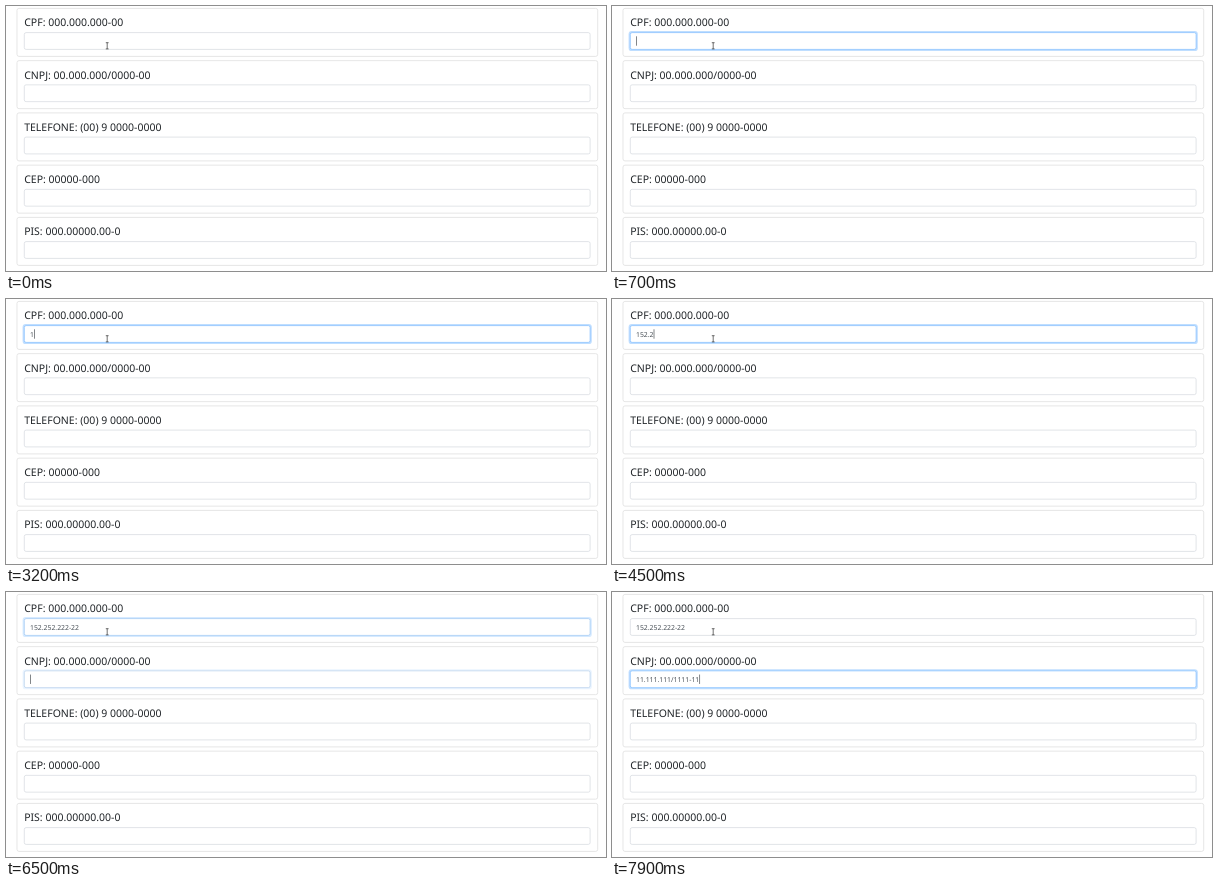
Write an HTML page that moves like this. It is 600x265 px and loops after 8 s.

```html
<!DOCTYPE html>
<html lang="pt">
<head>
<meta charset="utf-8">
<style>
html, body { margin: 0; height: 100%; overflow: hidden; background: #fff; }
svg { display: block; width: 600px; height: 265px; }
text { font-family: "Noto Sans", "Open Sans", sans-serif; text-rendering: geometricPrecision; }
.label { font-size: 10.5px; font-weight: 500; fill: #212529; }
.value { font-size: 6.85px; fill: #495057; }
.card { fill: #fff; stroke: #dcdcdc; stroke-width: .7; }
.glow { fill: #007bff; fill-opacity: .25; }
.box { fill: #fff; stroke-width: .7; }
.caret { fill: #30363b; }
.mouse { fill: none; stroke: #333; stroke-width: .7; }
</style>
</head>
<body>
<svg id="stage" viewBox="0 0 600 265"></svg>
<script>
const stage = document.getElementById('stage');
const LOOP = 8000, STEP = 100, PITCH = 52.25, FADE = 150;
const labels = ['CPF: 000.000.000-00', 'CNPJ: 00.000.000/0000-00',
  'TELEFONE: (00) 9 0000-0000', 'CEP: 00000-000', 'PIS: 000.00000.00-0'];
const values = ['152.252.222-22', '11.111.111/1111-11'];

// time, focused row, characters shown, caret visible
const events = [
  [0, -1, 0, 0], [600, 0, 0, 1], [1200, 0, 0, 0], [1700, 0, 0, 1],
  [2100, 0, 1, 1], [2700, 0, 1, 0], [3200, 0, 1, 1],
  [3300, 0, 2, 1], [3800, 0, 2, 0], [4000, 0, 3, 1],
  [4500, 0, 5, 1], [4700, 0, 6, 1], [5000, 0, 7, 1], [5500, 0, 14, 1],
  [6500, 1, 0, 1], [7000, 1, 1, 1], [7500, 1, 2, 1], [7600, 1, 6, 1],
  [7700, 1, 10, 1], [7800, 1, 14, 1], [7900, 1, 18, 1]
];
const focusAt = [540, 6440];

function add(tag, attrs, text = '') {
  const node = document.createElementNS('http://www.w3.org/2000/svg', tag);
  for (const key in attrs) node.setAttribute(key, attrs[key]);
  node.textContent = text;
  return stage.appendChild(node);
}

const rows = labels.map((label, i) => {
  const y = i * PITCH;
  add('rect', { class: 'card', x: 11, y: y + 2.4, width: 580.7, height: 48, rx: 2 });
  add('text', { class: 'label', x: 18.2, y: y + 20.4 }, label);
  return {
    glow: add('rect', { class: 'glow', x: 16.6, y: y + 24.9, width: 569.2, height: 20.2, rx: 3.2 }),
    box: add('rect', { class: 'box', x: 18.3, y: y + 26.6, width: 565.8, height: 16.8, rx: 1.8 }),
    value: add('text', { class: 'value', x: 24, y: y + 37.6 })
  };
});
const caret = add('rect', { class: 'caret', width: .6, height: 9.4 });
add('path', { class: 'mouse', d: 'M99.8 36.7h2.8M99.8 42.9h2.8M101.2 36.7v6.2' });

const mix = (a, b, p) => `rgb(${a.map((v, i) => v + (b[i] - v) * p)})`;
const ease = (t, start) => {
  const p = Math.min(1, Math.max(0, (t - start) / FADE));
  return p * p * (3 - 2 * p);
};

function draw(time) {
  const t = Math.floor(time % LOOP / STEP) * STEP;
  const [, active, count, visible] = events.findLast(e => e[0] <= t);
  const second = ease(t, focusAt[1]);
  const focus = [ease(t, focusAt[0]) * (1 - second), second];
  rows.forEach((row, i) => {
    const p = focus[i] || 0;
    row.glow.setAttribute('opacity', p);
    row.box.style.stroke = mix([212, 217, 222], [128, 189, 255], p);
    const shown = i < active ? Infinity : i === active ? count : 0;
    row.value.textContent = (values[i] || '').slice(0, shown);
  });
  caret.setAttribute('opacity', visible);
  if (active >= 0) {
    const width = count ? rows[active].value.getComputedTextLength() : 0;
    caret.setAttribute('x', 24.2 + width);
    caret.setAttribute('y', active * PITCH + 30.3);
  }
}

const start = performance.now();
function tick() {
  draw(performance.now() - start);
  requestAnimationFrame(tick);
}
tick();
</script>
</body>
</html>
```
